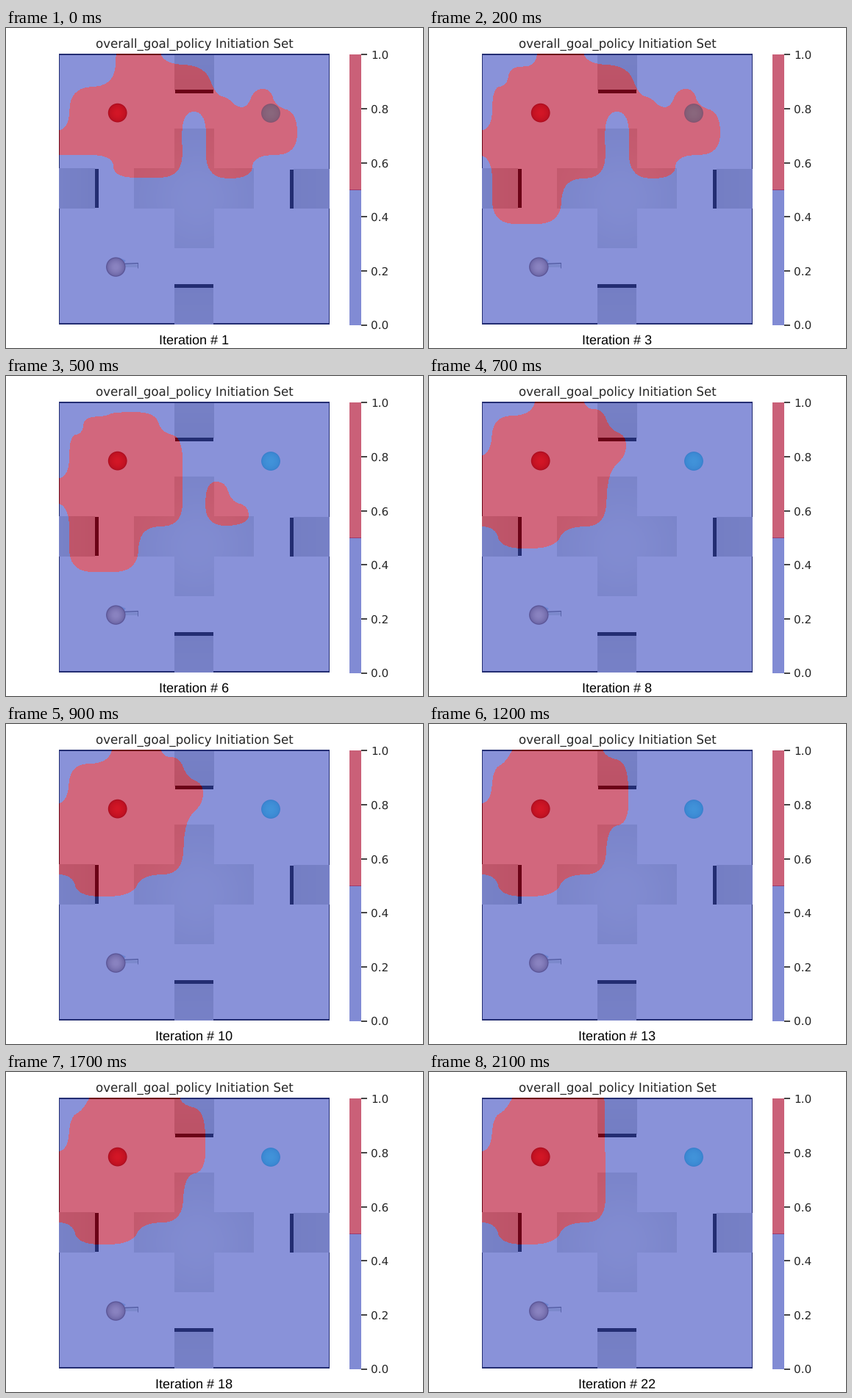
Animation, 567 px wide and 436 px high, one loop 3400 ms. Source, as a matplotlib script:

```python
import numpy as np
import matplotlib.pyplot as plt
from matplotlib.animation import FuncAnimation
from matplotlib.patches import Circle, Rectangle
from matplotlib.path import Path

plt.rcParams["text.hinting"] = "none"

W, H, DPI = 567, 436, 100
X0, X1, Y0, Y1 = 72, 440, 36, 404
FRAMES, INTERVAL, LAST = 34, 100, 22
BLUE, RED, ALPHA = (59, 76, 192), (180, 4, 38), 0.6
INK = "#262626"

# Corners of the initiation set, clockwise; rounded off by blob()
NOTCH = [(50, 141), (86, 141)]
SLOPE = [(50, 110), (84, 110)]
ARM = [(207, 15), (212, 50), (270, 52), (285, 92), (302, 96), (314, 109),
       (328, 109), (338, 84), (360, 84), (366, 108), (396, 116), (396, 174),
       (336, 174), (334, 206), (272, 206), (272, 115), (239, 115)]
SHELF = [(240, 205), (146, 205), (146, 174), (50, 174)]
LEG = [(240, 206), (181, 206), (179, 267), (86, 267), (86, 176), (50, 172)]
WAVE = [(240, 206), (186, 206), (170, 235), (98, 235), (90, 206), (50, 206)]
ISLAND = [(271, 146), (298, 144), (306, 172), (330, 178), (330, 204),
          (271, 206)]
STEP = [(87, 82), (149, 80), (149, 15)]
DENT = [(86, 82), (106, 80), (110, 53), (146, 54), (148, 15)]
CAP = [(86, 82), (104, 80), (106, 57), (136, 56), (146, 50), (203, 50),
       (211, 78), (240, 84)]
BUMP = [(87, 55), (140, 55), (149, 15), (206, 15), (212, 46), (236, 46),
        (246, 74), (268, 82), (268, 110), (243, 132)]
ROUND = [(87, 62), (104, 54), (122, 20)]
BULGE = [(233, 20), (238, 46), (270, 52), (272, 136), (242, 142)]
WALL = [(239, 15)]

# (first iteration, blobs)
STAGES = [
    (1, [NOTCH + STEP + ARM + SHELF]),
    (3, [NOTCH + DENT + ARM + LEG]),
    (5, [NOTCH + CAP + LEG, ISLAND]),
    (8, [SLOPE + BUMP + WAVE]),
    (12, [SLOPE + ROUND + BULGE + WAVE]),
    (20, [SLOPE + ROUND + WALL + WAVE]),
]


def rgb(*c):
    return tuple(v / 255 for v in c)


def over(color, back):
    return rgb(*(ALPHA * c + (1 - ALPHA) * b for c, b in zip(color, back)))


def blob(corners, r=32):
    """Closed path with each corner cut by a curve at most r long."""
    p = np.array(corners, float)
    verts = []
    for a, b, c in zip(np.roll(p, 1, axis=0), p, np.roll(p, -1, axis=0)):
        start, end = (b + (q - b) * min(0.5, r / np.hypot(*(q - b)))
                      for q in (a, c))
        verts += [start, b, end]
    codes = [Path.LINETO, Path.CURVE3, Path.CURVE3] * len(p)
    codes[0] = Path.MOVETO
    return Path(verts, codes)


def overlay(blobs):
    ys, xs = np.mgrid[Y0:Y1, X0:X1] + 0.5
    grid = np.column_stack([xs.ravel(), ys.ravel()])
    inside = np.any([blob(b).contains_points(grid) for b in blobs], axis=0)
    img = np.full(xs.shape + (4,), ALPHA)
    img[..., :3] = np.where(inside.reshape(xs.shape)[..., None], RED, BLUE)
    img[..., :3] /= 255
    return img


def room():
    """Floor with dark border and grey blocks."""
    y, x = np.mgrid[Y0:Y1, X0:X1] + 0.5
    img = np.full(x.shape + (3,), 255.0)
    img[..., 1] = 251
    img[(x < 73) | (x > 438.6) | (y < 38) | (y > 402)] = 0

    def block(xa, xb, ya, yb, tone):
        m = (x > xa) & (x < xb) & (y > ya) & (y < yb)
        img[m] = (tone + 0 * x)[m][:, None]

    cross = 216 + 20 * np.exp(-((x - 260) ** 2 + (y - 232) ** 2) / 4500)
    block(229, 283, 138, 300, cross)
    block(174, 337, 192, 246, cross)
    block(229, 283, 38, 86, 208 - 0.15 * (y - 38))
    block(229, 282, 353, 404, 203 + 0.12 * (y - 353))
    block(72, 121, 192, 246, 212 - 0.2 * (x - 72))
    block(391, 440, 193, 246, 203 + 0.1 * (x - 391))
    block(230, 282, 85, 90, 0)
    block(229, 282, 349, 354, 0)
    block(121, 126, 193, 245, 0)
    block(386, 391, 194, 246, 0)
    return img / 255


fig = plt.figure(figsize=(W / DPI, H / DPI), dpi=DPI, facecolor="white")
ax = fig.add_axes([0, 0, 1, 1])
ax.axis("off")


def layer(img, z):
    return ax.imshow(img, extent=(X0, X1, Y1, Y0), interpolation="nearest",
                     aspect="auto", zorder=z)


def rect(x0, y0, x1, y1, color, z=2):
    ax.add_patch(Rectangle((x0, y0), x1 - x0, y1 - y0, fc=color, lw=0,
                           zorder=z))


def ball(x, y, r, rim, core):
    for k in np.linspace(0, 1, 10):
        c = [a + (b - a) * k ** 0.4 for a, b in zip(rim, core)]
        ax.add_patch(Circle((x, y), r * (1 - 0.75 * k), fc=rgb(*c), lw=0,
                            zorder=4))


def line(xs, ys, color, px):
    ax.plot(xs, ys, color=color, lw=px * 72 / DPI, zorder=3,
            solid_capstyle="butt")


def label(x, y, text, size, family="DejaVu Sans", color=INK, ha="center",
          va="baseline"):
    return ax.text(x, y, text, fontsize=size, family=family, color=color,
                   ha=ha, va=va)


layer(room(), 1)

# Agent with its gripper, and the two balls
rect(162, 322, 179, 326, rgb(222, 228, 222))
line([153, 162], [314, 318], rgb(180, 215, 235), 3)
line([160, 180], [321.3, 320.5], rgb(95, 95, 95), 1.2)
line([179.3, 179.3], [319.5, 327], rgb(140, 140, 140), 1)
ball(149.3, 325.6, 13.2, (135, 95, 85), (255, 212, 192))
ball(151.7, 115.6, 12.9, (165, 25, 20), (255, 50, 38))
ball(360, 116, 12.9, (50, 205, 225), (74, 252, 255))

region = layer(np.zeros((Y1 - Y0, X1 - X0, 4)), 6)

# Colour bar
back = (234, 234, 242)
rect(467, 220.5, 483, 405, over(BLUE, back))
rect(467, 36, 483, 220.5, over(RED, back))
rect(467, 220, 483, 221, rgb(160, 58, 108), 3)
for v in np.arange(6) / 5:
    y = 404.5 - 368 * v
    line([483, 491.4], [y, y], INK, 1.7)
    label(496.4, y, f"{v:.1f}", 11, ha="left", va="center_baseline")

label(256.3, 27, "overall_goal_policy Initiation Set", 12)
caption = label(255.7, 431, "", 13, "Liberation Sans", "black")

ax.set_xlim(0, W)
ax.set_ylim(H, 0)

masks = [(start, overlay(blobs)) for start, blobs in STAGES]


def update(i):
    step = min(i + 1, LAST)
    region.set_data([m for start, m in masks if start <= step][-1])
    caption.set_text(f"Iteration # {step}")
    return region, caption


anim = FuncAnimation(fig, update, frames=FRAMES, interval=INTERVAL,
                     repeat=True, repeat_delay=0, blit=False)
plt.show()
```
